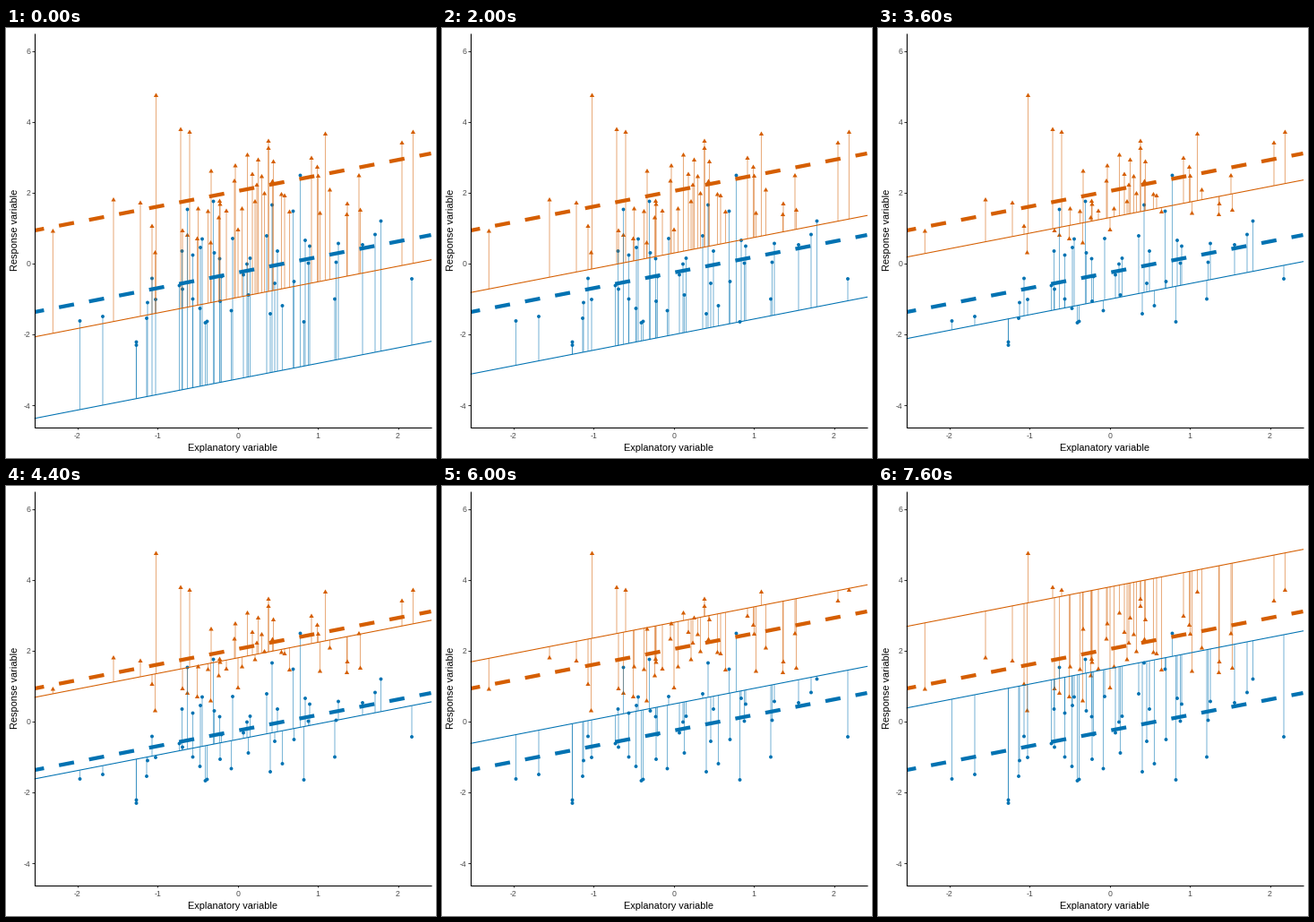
A matplotlib script for the animation above (8 s loop, 480x480 px).

```python
import numpy as np
import matplotlib.pyplot as plt
from matplotlib.animation import FuncAnimation
from matplotlib.collections import LineCollection, PolyCollection

SIZE, DPI = 480, 72
FRAMES, INTERVAL = 20, 400
LEFT, RIGHT, TOP, BOTTOM = 32.2, 474.5, 5.5, 445.7
X0, XUNIT, Y0, YUNIT = 258.7, 89.4, 263.1, 39.58
SLOPE = 0.4388
FONT = "Liberation Sans"
THIN = 1.07

# Observations as (x, y) stage positions.
TRIANGLES = np.reshape([
    52.4, 227, 120, 192, 150, 195.5, 167.5, 75.5, 163, 221.5, 166.5, 251,
    195, 113.5, 205, 116.5, 197, 226.5, 202.5, 231.5, 214.5, 202, 213.5, 235.5,
    225.5, 205, 229, 160, 228.5, 240, 238.5, 193.5, 239, 197, 237.5, 212,
    246, 204.5, 256, 154, 255, 171, 259, 225.5, 263.5, 202, 269.5, 142,
    275, 163.5, 278, 194, 281.5, 147.5, 280, 175.5, 285.5, 166, 288.5, 185,
    293, 126.5, 293, 134.5, 298.5, 149.5, 297.5, 171.5, 307.5, 186, 311, 187.5,
    316.5, 205.5, 341, 145.5, 347.5, 155.5, 348.5, 165.5, 350.5, 207,
    356.5, 118.5, 361.5, 181, 381, 196.5, 380.5, 208.5, 394, 165, 395.5, 203.5,
    442, 128.5, 454.4, 116.5], (-1, 2))
CIRCLES = np.reshape([
    82.5, 327, 108, 322, 145.5, 350.5, 145.5, 354, 157, 324, 158, 306.5,
    163, 279.5, 167, 303, 193.5, 287.5, 196.5, 249, 197, 291.5, 202.5, 202.5,
    208.5, 253.5, 208.5, 302.5, 216.5, 313, 217, 245, 219, 235.5, 222.5, 329,
    224.5, 327.5, 231.5, 193.5, 232.5, 251, 238.5, 257.5, 239, 305, 240.5, 277.5,
    251.5, 315.5, 253, 235, 265, 275.5, 269, 263.5, 270.5, 298, 272.5, 257,
    291, 232, 295, 319, 297, 197.5, 300, 285, 303, 249, 308.5, 310,
    320.5, 204.5, 321.5, 283, 328.5, 164.5, 332.5, 328, 334, 237, 337.5, 262.5,
    339, 243.5, 367, 302.5, 368.5, 261.5, 371, 240.5, 398, 242, 412, 230.5,
    418.5, 215.5, 453, 280], (-1, 2))


def fit_y(x, intercept):
    """Stage height of the regression line at stage position x."""
    return Y0 - YUNIT * (intercept + SLOPE * (x - X0) / XUNIT)


def polygon(sides, radius):
    angle = -np.pi / 2 + 2 * np.pi * np.arange(sides) / sides
    return radius * np.column_stack([np.cos(angle), np.sin(angle)])


class Group:
    ENDS = np.array([LEFT, RIGHT])

    def __init__(self, ax, points, shape, color, intercept):
        self.points, self.intercept = points, intercept
        ax.add_collection(PolyCollection(
            points[:, None, :] + shape, facecolor=color, edgecolor="none", zorder=2))
        self.residuals = LineCollection([], colors=color, alpha=0.5,
                                        linewidths=THIN, zorder=3, snap=False)
        ax.add_collection(self.residuals)
        self.line, = ax.plot([], [], color=color, lw=THIN, zorder=4)
        ax.plot(self.ENDS, fit_y(self.ENDS, intercept), color=color, lw=4.27,
                ls=(1.57, (4, 4)), dash_capstyle="butt", zorder=5)

    def shift(self, offset):
        level = self.intercept + offset
        x, y = self.points.T
        fitted = np.column_stack([x, fit_y(x, level)])
        self.residuals.set_segments(np.stack([self.points, fitted], axis=1))
        self.line.set_data(self.ENDS, fit_y(self.ENDS, level))
        return self.residuals, self.line


def draw_axes(ax):
    label = dict(fontsize=8.8, color="#4d4d4d", family=FONT, va="baseline")
    title = dict(fontsize=11, color="black", family=FONT, ha="center",
                 va="baseline", rotation_mode="anchor")
    tick = dict(color="#333333", lw=THIN, solid_capstyle="butt")
    for value in range(-2, 3):
        x = X0 + XUNIT * value
        ax.plot([x, x], [BOTTOM, BOTTOM + 2.75], **tick)
        ax.text(x, 457.8, str(value), ha="center", **label)
    for value in range(-4, 7, 2):
        y = Y0 - YUNIT * value
        ax.plot([LEFT - 2.75, LEFT], [y, y], **tick)
        ax.text(27.3, y + 3.15, str(value), ha="right", **label)
    ax.plot([LEFT, LEFT, RIGHT], [TOP, BOTTOM, BOTTOM], color="black",
            lw=THIN, solid_capstyle="butt", zorder=6)
    ax.text((LEFT + RIGHT) / 2, 472, "Explanatory variable", **title)
    ax.text(13, (TOP + BOTTOM) / 2, "Response variable", rotation=90, **title)


fig = plt.figure(figsize=(SIZE / DPI, SIZE / DPI), dpi=DPI, facecolor="white")
ax = fig.add_axes([0, 0, 1, 1])
ax.axis("off")
draw_axes(ax)
groups = [Group(ax, TRIANGLES, polygon(3, 3.04), "#D55E00", 2.05),
          Group(ax, CIRCLES, polygon(24, 1.95), "#0072B2", -0.25)]
ax.set(xlim=(0, SIZE), ylim=(SIZE, 0))


def update(frame):
    offset = -3 + 0.25 * frame
    return [artist for group in groups for artist in group.shift(offset)]


anim = FuncAnimation(fig, update, frames=FRAMES, interval=INTERVAL,
                     repeat=True, repeat_delay=0)
plt.show()
```
